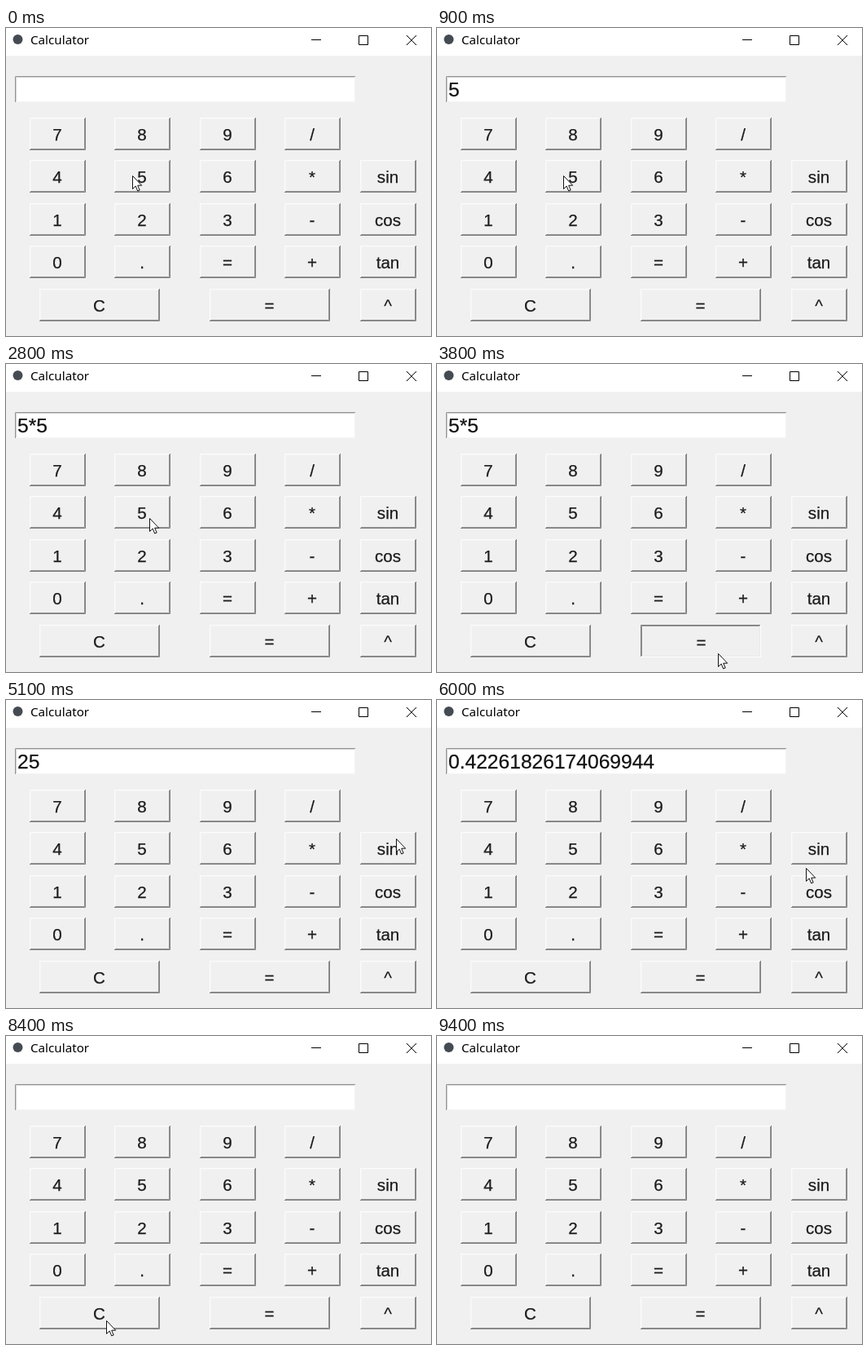
An HTML page for the animation above (10 s loop, 522 by 378 pixels).

```html
<!DOCTYPE html>
<html lang="en">
<head>
<meta charset="utf-8">
<title>Calculator</title>
<style>
html, body { margin: 0; width: 100%; height: 100%; overflow: hidden; background: #f0f0f0; }
svg { display: block; width: 522px; height: 378px; }
text { font-family: "Liberation Sans", Arial, sans-serif; fill: #1c1c1c; white-space: pre; }
.title { font: 15.2px "Noto Sans", "Open Sans", sans-serif; fill: #000; }
.key { font-size: 20.6px; text-anchor: middle; stroke: #1c1c1c; stroke-width: .25px; }
.entry { font-size: 24.6px; fill: #111; stroke: #111; stroke-width: .25px; }
.icon, .bevel { fill: none; stroke: #000; }
</style>
</head>
<body>
<svg id="stage" viewBox="0 0 522 378">
  <rect width="522" height="378" fill="#f0f0f0"/>
  <rect width="522" height="34" fill="#fff"/>
  <circle cx="14.5" cy="14" r="6" fill="#454b52"/>
  <text class="title" x="30" y="20">Calculator</text>
  <path class="icon" d="M375 14.5H387M433.5 9.5H444.5V20.5H433.5ZM492 9L504 21M504 9L492 21"/>
  <rect x="11" y="59" width="418" height="32" fill="#fff"/>
  <path class="bevel" d="M11.5 91V59.5H429" style="stroke:#929292"/>
  <path class="bevel" d="M12.5 90V60.5H428" style="stroke:#d4d4d4"/>
  <path class="bevel" d="M13 90.5H428.5V61" style="stroke:#f4f4f4"/>
  <text class="entry" id="entry" x="14" y="84"></text>
  <g id="keys"></g>
  <path id="cursor" d="M.5 .5V16.5L4.2 13L6.7 19L9.2 18L6.7 12.2H11.7Z" fill="#fff" stroke="#111"/>
</svg>
<script>
const LOOP = 10000, STEP = 100;
const $ = id => document.getElementById(id);
const rowY = [110, 162, 215, 267, 320], colX = [29, 133, 238, 342];
const keys = {};

function add(parent, tag, attrs) {
  const el = document.createElementNS("http://www.w3.org/2000/svg", tag);
  for (const name in attrs) el.setAttribute(name, attrs[name]);
  return parent.appendChild(el);
}

function addKey(label, x, y, w = 69, name = label) {
  const g = add($("keys"), "g", { transform: `translate(${x} ${y})` });
  const corner = (i, lit) => add(g, "path", {
    class: "bevel",
    d: lit ? `M${i + .5} ${39 - i}V${i + .5}H${w - 1 - i}`
           : `M${i} ${39.5 - i}H${w - .5 - i}V${i}`
  });
  const edges = [corner(0, true), corner(1, true), corner(1, false), corner(0, false)];
  const text = add(g, "text", { class: "key", x: w / 2 - .5, y: 27.5 });
  text.textContent = label;
  keys[name] = { edges, text };
  setPressed(name, false);
}

function setPressed(name, down) {
  const { edges, text } = keys[name];
  const colors = down ? ["#808080", "#909090", "#e8e8e8", "#fff"]
                      : ["#fbfbfb", "#f4f4f4", "#909090", "#808080"];
  edges.forEach((edge, i) => edge.style.stroke = colors[i]);
  text.setAttribute("transform", down ? "translate(1 1)" : "");
}

["789/", "456*", "123-", "0.=+"].forEach((row, r) =>
  [...row].forEach((label, c) => addKey(label, colX[c], rowY[r])));
["sin", "cos", "tan", "^"].forEach((label, i) => addKey(label, 435, rowY[i + 1]));
addKey("C", 41, rowY[4], 148);
addKey("=", 250, rowY[4], 148, "equals");

// key, press time, release time, display after release
const clicks = [
  ["5", 200, 400, "5"],
  ["*", 1900, 2100, "5*"],
  ["5", 2500, 2700, "5*5"],
  ["equals", 3700, 3900, "25"],
  ["sin", 5300, 5500, "0.42261826174069944"],
  ["C", 7200, 7300, ""]
];

// time, x, y of the pointer tip
const path = [
  [0, 155, 181], [900, 155, 181], [1600, 311, 232], [1900, 374, 190],
  [2100, 374, 190], [2500, 176, 189], [2900, 176, 189], [3600, 345, 355],
  [4600, 345, 355], [5100, 479, 170], [5700, 479, 170], [6700, 357, 337],
  [6800, 357, 337], [7100, 123, 349], [8700, 123, 349], [9300, 504, 366]
];

function pointerAt(t) {
  const i = path.findIndex(p => p[0] > t);
  if (i < 0) return path[path.length - 1].slice(1);
  const [a, b] = [path[i - 1], path[i]];
  const u = (t - a[0]) / (b[0] - a[0]), k = u * u * (3 - 2 * u);
  return [1, 2].map(n => Math.round(a[n] + (b[n] - a[n]) * k));
}

function draw(t) {
  let shown = "", held = null;
  for (const [name, down, up, value] of clicks) {
    if (t >= up) shown = value;
    else if (t >= down) held = name;
  }
  $("entry").textContent = shown;
  for (const name in keys) setPressed(name, name === held);
  $("cursor").setAttribute("transform", `translate(${pointerAt(t)})`);
  $("cursor").style.display = t < 9400 ? "" : "none";
}

const start = performance.now();
function tick() {
  const t = (performance.now() - start) % LOOP;
  draw(Math.floor(t / STEP) * STEP);
  requestAnimationFrame(tick);
}
tick();
</script>
</body>
</html>
```
